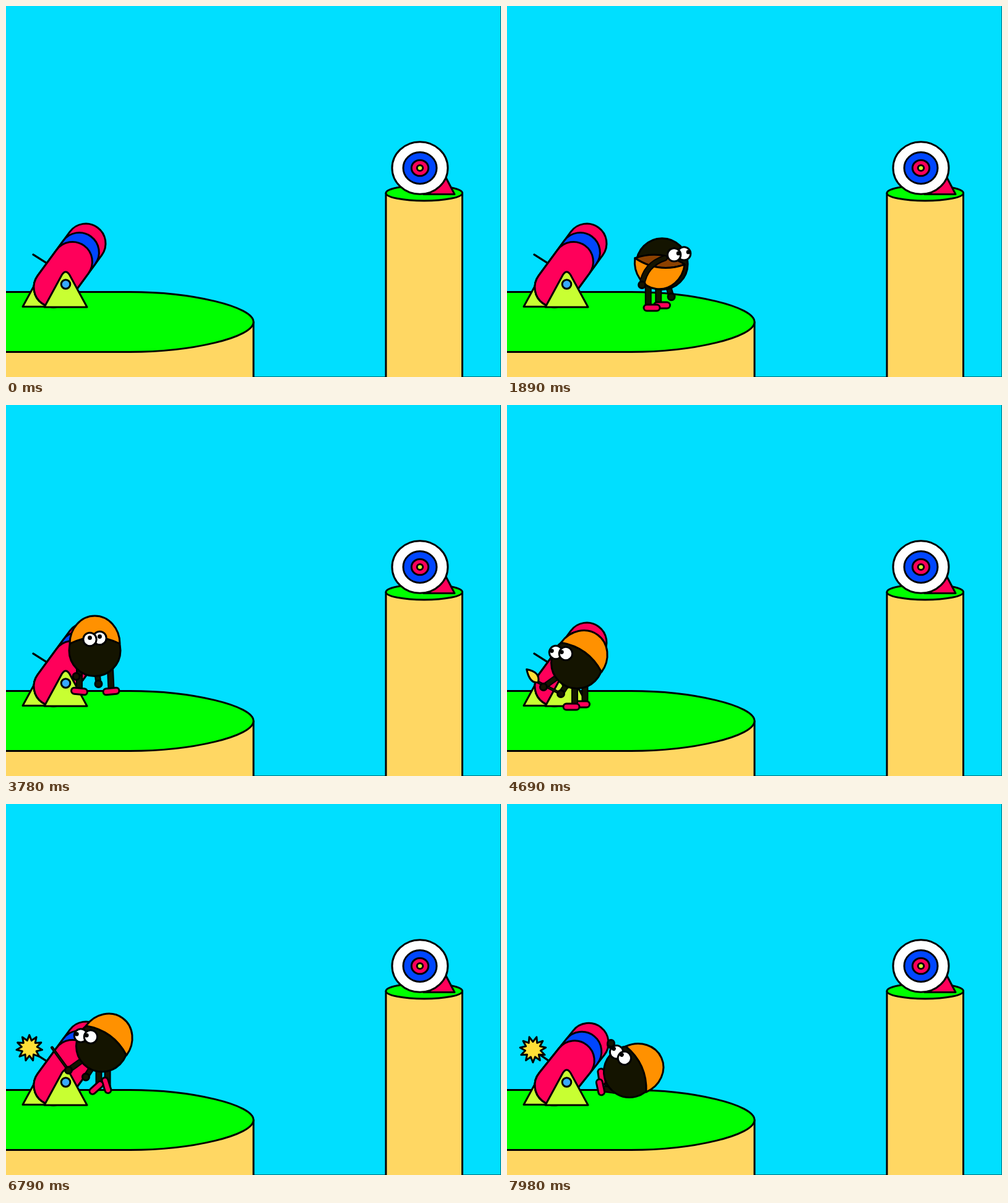
An HTML page with a canvas that plays this animation: 800x600 px, repeating every 8000 ms.

```html
<!DOCTYPE html>
<html>
<head>
<meta charset="utf-8">
<style>
html, body { margin: 0; width: 100%; height: 100%; overflow: hidden; background: #00dfff; }
canvas { display: block; }
</style>
</head>
<body>
<canvas id="stage" width="800" height="600"></canvas>
<script>
const ctx = document.getElementById('stage').getContext('2d');
const LOOP = 8000, STEP = 70, RAD = Math.PI / 180;
const RED = '#ff005a', BLUE = '#0046ff', LIME = '#c8ff32', GREEN = '#00ff00',
  SAND = '#ffd763', COAL = '#141400', ORANGE = '#ff9100', BROWN = '#8c4100', YELLOW = '#ffdf37';

const { sin, cos, PI } = Math;
const clamp = (v, lo, hi) => Math.min(hi, Math.max(lo, v));
const mix = (a, b, u) => a + (b - a) * u;
const mixPoint = (a, b, u) => a.map((v, i) => mix(v, b[i], u));
const ramp = (t, from, to) => clamp((t - from) / (to - from), 0, 1);
const smooth = (t, from, to) => {
  const u = ramp(t, from, to);
  return u * u * (3 - 2 * u);
};
const easeOut = u => 1 - (1 - u) ** 2;

function paint(fill, path) {
  ctx.fillStyle = fill;
  ctx.strokeStyle = '#000';
  ctx.lineWidth = 3;
  ctx.fill(path);
  ctx.stroke(path);
}
const svg = (d, fill) => paint(fill, new Path2D(d));
function ellipse(x, y, rx, ry, fill) {
  const path = new Path2D();
  path.ellipse(x, y, rx, ry, 0, 0, 2 * PI);
  paint(fill, path);
}
const disc = (x, y, r, fill) => ellipse(x, y, r, r, fill);
function placed(x, y, angle, draw) {
  ctx.save();
  ctx.translate(x, y);
  ctx.rotate(angle * RAD);
  draw();
  ctx.restore();
}
function strand(d, outer, inner, fill) {
  const path = new Path2D(d);
  for (const [width, color] of [[outer, '#000'], [inner, fill]]) {
    ctx.lineWidth = width;
    ctx.strokeStyle = color;
    ctx.stroke(path);
  }
}

function scenery() {
  ctx.fillStyle = '#00707f';
  ctx.fillRect(0, 0, 800, 600);
  ctx.fillStyle = '#00dfff';
  ctx.fillRect(0, 0, 799, 599);
  svg('M-5 511H400V610H-5Z', SAND);
  svg('M-5 462.5H200C300 462.5 400 486 400 511S300 559.5 200 559.5H-5Z', GREEN);
  svg('M614 303V610H737.5V303Z', SAND);
  ellipse(675.8, 302.5, 61.8, 12.5, GREEN);
  svg('M706 268L725 304.5H675Z', RED);
  ellipse(669, 262, 45, 42.3, '#fff');
  ellipse(669, 262, 27, 25.5, BLUE);
  ellipse(669, 262, 13.7, 12.8, RED);
  ellipse(669, 262, 4.8, 4.6, LIME);
}

function stand(x, y) {
  placed(x, y, 0, () => svg('M-34.5 37L-6 -15.5Q0 -24.5 6 -15.5L34.5 37Z', LIME));
}

function cannon(tilt) {
  stand(61.5, 449.3);
  placed(77, 455, tilt, () => {
    strand('M-33 -53L-11 -39', 3, 3, '#000');
    ctx.rotate(-53.8 * RAD);
    for (const [length, fill] of [[88, RED], [70, BLUE], [51.5, RED]])
      svg(`M0 -32H${length}A32 32 0 0 1 ${length} 32H0A32 32 0 0 1 0 -32Z`, fill);
  });
  stand(96.5, 450);
  disc(96.5, 450, 7.3, '#37a8ff');
}

function spark(t) {
  const burn = ramp(t, 6000, 8000), points = 11;
  const path = new Path2D();
  for (let i = 0; i < 2 * points; i++) {
    const r = i % 2 ? 12.5 : 21, a = i * PI / points - PI / 2;
    path.lineTo(r * cos(a), r * sin(a));
  }
  path.closePath();
  placed(35 + 7 * burn, 393 + 4 * burn, t / STEP % 2 ? 0 : 180, () => paint(YELLOW, path));
}

// Where every part of the hero is at time t.
function poseAt(t) {
  const walk = ramp(t, 70, 980);
  const don = smooth(t, 1820, 2590), settle = smooth(t, 2730, 3100);
  const away = don - settle;
  const leap = ramp(t, 3500, 4060), leapX = easeOut(leap), hop = sin(PI * leap);
  const back = ramp(t, 6580, 7390), backX = easeOut(back), hopBack = sin(PI * back);
  const crouch = sin(PI * ramp(t, 3220, 3500)) + sin(PI * ramp(t, 6300, 6580));
  const lookLeft = smooth(t, 3850, 4060), climb = smooth(t, 7700, 7980);
  const lift = 20 * hop + 35 * hopBack, tuck = 5 * (hop + hopBack);

  const standX = 251 - 17 * away - 16 * smooth(t, 3100, 3500);
  let x = mix(mix(mix(-55, standX, walk), 113, leapX), 206, backX) - 8 * climb;
  let y = 417 + 9 * away + 5 * crouch - lift + 16 * climb;

  // Planted feet move only in leaps, or alternate while walking in.
  const footX = mix(mix(234, 104, leapX), 197, backX);
  const footY = 488 - lift - tuck;
  let near = [footX - 18 * hop, footY, 6 * hop - 58 * hopBack];
  let far = [footX + 16.5 + 17 * hop, footY - 4 * (1 - hop), -6 * hop + 100 * hopBack];
  if (walk < 1) {
    const phase = (1 - walk) * 13.6;
    const step = (dx, ground, p) => [x + dx - 20 * sin(p), ground - 16 * clamp(cos(p), 0, 1) * ramp(980 - t, 0, 140), 0];
    near = step(-17, 488, phase);
    far = step(-.5, 484, phase + PI);
    y -= 20 * Math.abs(sin(phase));
  }
  near = mixPoint(near, [151, 458, 78], climb);
  far = mixPoint(far, [153, 441, 82], climb);

  // The helmet scoops out to the side, up and over, then sits on the head.
  const angle = mix(193, -50, don) + 50 * settle + 36 * lookLeft;
  const scoop = sin(PI * don);
  const helmet = don < 1
    ? [-8 + 60 * scoop, -4 - 4 * don - 42 * scoop ** 2, angle]
    : [12 * sin(angle * RAD), -11 * cos(angle * RAD), angle];

  const grip = smooth(t, 4130, 4400), light = smooth(t, 4900, 5180), reach = smooth(t, 7350, 7850);
  const lighting = light - smooth(t, 5740, 6020);
  const hold = [helmet[0] - mix(29, 23, don), helmet[1] + mix(39, 2, don)];
  let nearHand = mixPoint(hold, [-30, 42], settle);
  nearHand = mixPoint(nearHand, [-26, 50], grip);
  let farHand = mixPoint([15, 53], [6, 54], settle);
  farHand = mixPoint(farHand, [-54, 39], grip);
  farHand = mixPoint(farHand, [-45, 25], lighting);
  return {
    x, y, near, far, helmet, light,
    tilt: 30 * climb,
    yaw: .65 + 1.85 * away - .65 * smooth(t, 3100, 3500) - .65 * lookLeft,
    open: don < .8,
    nearHand: mixPoint(nearHand, [-30, -46], reach),
    farHand: mixPoint(farHand, [-30, -44], reach),
    shoulder: [mix(5, -19, don) + 19 * settle, mix(-10, 10, don)],
    bend: .32 * (1 - don),
    armInFront: settle < 1
  };
}

function match(t, pose) {
  if (t < 4200 || t > 7350) return;
  const [dx, dy] = mixPoint(pose.nearHand, pose.farHand, pose.light);
  const held = poseAt(6860), fall = ramp(t, 6860, 7350);
  let x = pose.x + dx, y = pose.y + dy;
  if (fall > 0) {
    x = held.x + held.farHand[0] - 25 * fall;
    y = held.y + held.farHand[1] - 60 * fall + 185 * fall ** 2;
  }
  placed(x, y, mix(207, 234, pose.light) - 250 * fall, () => {
    strand('M0 0H45', 5, 2, COAL);
    if (t > 4400 && t < 5900)
      placed(41, 0, 21, () => svg('M0 0Q7 -12 28 0Q10 14 0 0Z', YELLOW));
  });
}

function arm([sx, sy], [hx, hy], bend) {
  const cx = (sx + hx) / 2 - bend * (hy - sy), cy = (sy + hy) / 2 + bend * (hx - sx);
  strand(`M${sx} ${sy}Q${cx} ${cy} ${hx} ${hy}`, 10, 6, COAL);
  disc(hx, hy, 5.5, COAL);
}

function leg({ x: bodyX, y: bodyY, yaw }, [x, y, angle]) {
  const heel = -9 * sin(yaw);
  const ankleX = x + heel * cos(angle * RAD), ankleY = y + heel * sin(angle * RAD) - 3;
  const hip = clamp(ankleX, bodyX - 25, bodyX + 25);
  strand(`M${hip} ${bodyY + 30}L${ankleX} ${ankleY}`, 11, 7, COAL);
  placed(x, y, angle, () => strand('M-8 0H8', 13, 7, RED));
}

function helmetShape([x, y, angle], open) {
  placed(x, y, angle, () => {
    if (open) svg('M-40.5 0Q0 -20 40.5 0Q0 20 -40.5 0Z', BROWN);
    svg('M-40.5 0A40.5 45 0 0 1 40.5 0Q0 -20 -40.5 0Z', ORANGE);
  });
}

function eyes(yaw) {
  if (cos(yaw) < 0) return;
  const look = sin(yaw), side = look < 0 ? -1 : 1;
  for (const s of [side, -side]) {
    const x = 43 * look + 8 * s, y = -19 + 5 * Math.abs(look) - s * side;
    disc(x, y, 10.7, '#fff');
    ctx.beginPath();
    ctx.arc(x + 11 * look, y - 2.5, 3.4, 0, 2 * PI);
    ctx.fillStyle = '#000';
    ctx.fill();
  }
}

function hero(t) {
  const pose = poseAt(t);
  const nearArm = () => arm(pose.shoulder, pose.nearHand, pose.bend);
  leg(pose, pose.far);
  leg(pose, pose.near);
  match(t, pose);
  placed(pose.x, pose.y, 0, () => {
    arm([0, 0], pose.farHand, 0);
    if (!pose.armInFront) nearArm();
    placed(0, 0, pose.tilt, () => {
      disc(0, 0, 41.5, COAL);
      helmetShape(pose.helmet, pose.open);
      eyes(pose.yaw);
    });
    if (pose.armInFront) nearArm();
  });
}

const start = performance.now();
function frame() {
  const t = Math.floor((performance.now() - start) % LOOP / STEP) * STEP;
  ctx.lineCap = ctx.lineJoin = 'round';
  scenery();
  cannon(2.5 * ramp(t, 7700, 7980));
  if (t >= 5390) spark(t);
  if (t >= 140) hero(t);
  requestAnimationFrame(frame);
}
frame();
</script>
</body>
</html>
```
